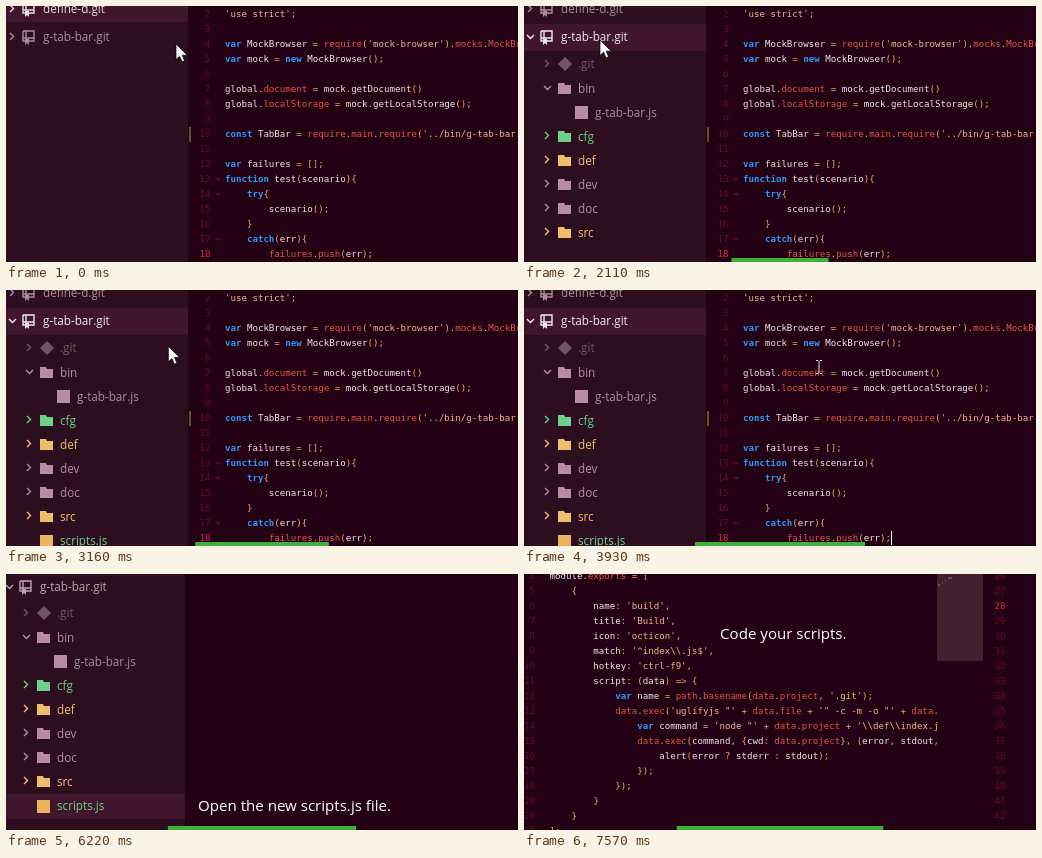
Write an HTML page that moves like this. It is 512 px wide and 256 px high and loops after 8 s.

```html
<!DOCTYPE html>
<html lang="en">
<head>
<meta charset="utf-8">
<title>Project tree and scripts</title>
<style>
  html, body { margin: 0; width: 100%; height: 100%; overflow: hidden; background: #230013; }
  svg { display: block; width: 100vw; height: 100vh; }
  text { white-space: pre; }
  .code { font: 9.12px "DejaVu Sans Mono", monospace; fill: #f3e4e6; }
  .key { fill: #2f97f5; font-weight: bold; }
  .name { fill: #e0564f; }
  .str { fill: #eeb596; }
  .op { fill: #e8a878; }
  .num { fill: #620f2c; text-anchor: end; }
  .now { fill: #dc2448; }
  .tree { font: 11.7px "Open Sans", "Noto Sans", sans-serif; }
  .cap { font: 15.1px "Open Sans", "Noto Sans", sans-serif; fill: #fff; }
  .line { fill: none; stroke-width: 1.4; }
</style>
</head>
<body>
<svg id="stage" viewBox="0 0 512 256"></svg>
<script>
const TEST = `'use strict';

var MockBrowser = require('mock-browser').mocks.MockBrowser;
var mock = new MockBrowser();

global.document = mock.getDocument()
global.localStorage = mock.getLocalStorage();

const TabBar = require.main.require('../bin/g-tab-bar.js');

var failures = [];
function test(scenario){
    try{
        scenario();
    }
    catch(err){
        failures.push(err);`;

const SCRIPT = String.raw`module.exports = [
    {
        name: 'build',
        title: 'Build',
        icon: 'octicon',
        match: '^index\\.js$',
        hotkey: 'ctrl-f9',
        script: (data) => {
            var name = path.basename(data.project, '.git');
            data.exec('uglifyjs "' + data.file + '" -c -m -o "' + data.project
                var command = 'node "' + data.project + '\\def\\index.js"';
                data.exec(command, {cwd: data.project}, (error, stdout, stderr)
                    alert(error ? stderr : stdout);
                });
            });
        }
    }
];`;

const DIM = '#a98c9e', GOLD = '#efc06c', GREEN = '#6fd08c', GREY = '#705665', PINK = '#b78da6';
const $ = id => document.getElementById(id);
const rect = (x, y, w, h, fill, more = '') =>
  `<rect x="${x}" y="${y}" width="${w}" height="${h}" fill="${fill}" ${more}/>`;
const text = (x, y, s, cls, more = '') => `<text x="${x}" y="${y}" class="${cls}" ${more}>${s}</text>`;
const group = (id, body, more = '') => `<g id="${id}" ${more}>${body}</g>`;

// Syntax colouring
const TOKEN = /('[^']*'?)|\b(var|new|const|function|try|catch)\b|(\brequire\b|(?<=\.)(?!get)\w+|\b(?:failures|data|path)(?=\.))|([^\w\s])/g;
const paint = s => s.replace(TOKEN, (m, str, key, name) =>
  `<tspan class="${str ? 'str' : key ? 'key' : name ? 'name' : 'op'}">${m}</tspan>`);

const code = (src, x, y) => src.split('\n').map((s, i) => text(x, y + 15 * i, paint(s), 'code')).join('');
const numbers = (from, to, x, y, now) => {
  let out = '';
  for (let n = from; n <= to; n++)
    out += text(x, y + 15 * (n - from), n, 'code num' + (n === now ? ' now' : ''));
  return out;
};

// Tree parts; y is the middle of a row
const chevron = (x, y, open, c) =>
  `<path class="line" stroke="${c}" d="${open ? `M${x - 1} ${y - 2}l3.5 3.5 3.5-3.5` : `M${x} ${y - 4}l3.5 3.5-3.5 3.5`}"/>`;
const book = (y, c) =>
  `<path class="line" stroke="${c}" d="M17 ${y - 6}h11v10h-5M19 ${y + 4}h-2v-10M20 ${y - 6}v9M17 ${y + 1}h11"/>
   <path fill="${c}" d="M19 ${y + 2}h4v6l-2-2-2 2z"/>`;
const folder = (y, c) => `<path fill="${c}" d="M34 ${y - 6}h6l1 2h6v9h-13z"/>`;
const label = (x, y, s, c) => text(x, y + 4, s, 'tree', `fill="${c}"`);
const folderRow = (y, s, c, open) => chevron(21, y - 1, open, c) + folder(y, c) + label(54, y, s, c);
const rootRow = (y, s, c, open) => chevron(4, y, open, c) + book(y, c) + label(37, y, s, c);

const children =
  chevron(21, 58, false, GREY) + rect(36, 53, 10, 10, GREY, 'transform="rotate(45 41 58)"') + label(54, 58, '.git', GREY) +
  folderRow(83, 'bin', PINK, true) + rect(51, 100, 13, 13, PINK) + label(71, 107, 'g-tab-bar.js', DIM) +
  [['cfg', GREEN], ['def', GOLD], ['dev', PINK], ['doc', PINK], ['src', GOLD]]
    .map(([s, c], i) => folderRow(131 + 24 * i, s, c)).join('');
const scriptRow = rect(34, 245, 13, 13, '#e9b45e') + label(54, 251, 'scripts.js', GREEN);

const side = rect(-1, -1, 183, 300, '#2c0e1e');
const select = (y, h) => rect(-1, y, 183, h, '#40162d');
const folds = [13, 14, 17].map(n => `<path class="line" stroke="#620f2c" d="M210 ${15 * n - 23}l2 2 2-2"/>`).join('');

$('stage').innerHTML =
  group('edit',
    side +
    group('shut', select(-1, 17) + rootRow(3, 'define-d.git', '#eadbe4') + rootRow(31, 'g-tab-bar.git', DIM)) +
    group('open', select(18, 27) + rootRow(3, 'define-d.git', DIM) + rootRow(31, 'g-tab-bar.git', '#f3e6ee', true) + children) +
    group('made', scriptRow) +
    rect(182, 0, 330, 256, '#230013') + rect(183, 121, 2, 15, '#65501c') +
    numbers(2, 18, 204.5, 11, 18) + folds + code(TEST, 219, 11) +
    group('caret', rect(367, 241, 1, 14, '#fff'))) +
  group('pick',
    group('', side + select(239, 25) + rootRow(32, 'g-tab-bar.git', '#bda3b2', true) + children + scriptRow,
      'transform="translate(-3 -19)"')) +
  group('write',
    numbers(4, 21, 11, 5) + code(SCRIPT, 25.5, 5) +
    rect(413, 0, 99, 256, '#230013') + rect(413, 0, 46, 87, '#42212f') +
    '<path d="M414 11h2m2-2h1m2-2h1m2-3h4" stroke="#93727f" fill="none"/>' +
    numbers(26, 42, 481.5, 5, 28)) +
  group('cap1', text(16, 242, 'Open a Project Root', 'cap')) +
  group('cap2', text(192, 237, 'Open the new scripts.js file.', 'cap')) +
  group('cap3', text(196, 65, 'Code your scripts.', 'cap')) +
  group('arrow', '<path d="M0 0v15.5l3.6-3.3 2.4 5.6 2.6-1.1-2.4-5.5h5z" fill="#fff" stroke="#000" stroke-width=".7"/>') +
  group('beam', '<path d="M-3-6.5h2l1 1 1-1h2M0-5.5v11M-3 6.5h2l1-1 1 1h2" fill="none" stroke="#e8dde2"/>') +
  '<rect id="bar" y="252" height="4" fill="#3fb137"/>';

const TICKS = [[0, 0], [80, 1], [860, 13], [920, 14], [1700, 26], [1770, 27], [2310, 35], [2630, 37],
  [3370, 48], [3440, 49], [4060, 58], [7300, 64], [7570, 68], [8000, 69]];
// Step number to pointer position
const PATH = [[0, 170, 38], [1, 170, 38], [13, 10, 33], [20, 10, 33], [26, 53, 33], [32, 76, 34],
  [35, 96, 46], [38, 96, 46], [56, 295, 77], [69, 295, 77]];

function lerp(keys, at, col) {
  let i = 1;
  while (i < keys.length - 1 && keys[i][0] <= at) i++;
  const a = keys[i - 1], b = keys[i];
  return a[col] + (b[col] - a[col]) * (at - a[0]) / (b[0] - a[0]);
}
const show = (id, on) => { $(id).style.display = on ? '' : 'none'; };

function draw(now) {
  const step = Math.floor(lerp(TICKS, now % 8000, 1) + 1e-6);
  const within = (a, b) => step >= a && step < b;
  show('edit', step < 58);
  show('shut', step < 21);
  show('open', step >= 21);
  show('made', step >= 43);
  show('caret', step >= 50);
  show('pick', within(58, 66));
  show('write', step >= 66);
  show('cap1', within(7, 21));
  show('cap2', within(58, 64));
  show('cap3', step >= 68);

  const x = lerp(PATH, step, 1), y = lerp(PATH, step, 2);
  show('arrow', step < 58 && x < 183);
  show('beam', step < 58 && x >= 183);
  for (const id of ['arrow', 'beam']) $(id).setAttribute('transform', `translate(${x} ${y})`);

  const half = 1.518 * step;
  $('bar').setAttribute('x', 256 - half);
  $('bar').setAttribute('width', 2 * half);
  requestAnimationFrame(draw);
}
requestAnimationFrame(draw);
</script>
</body>
</html>
```
